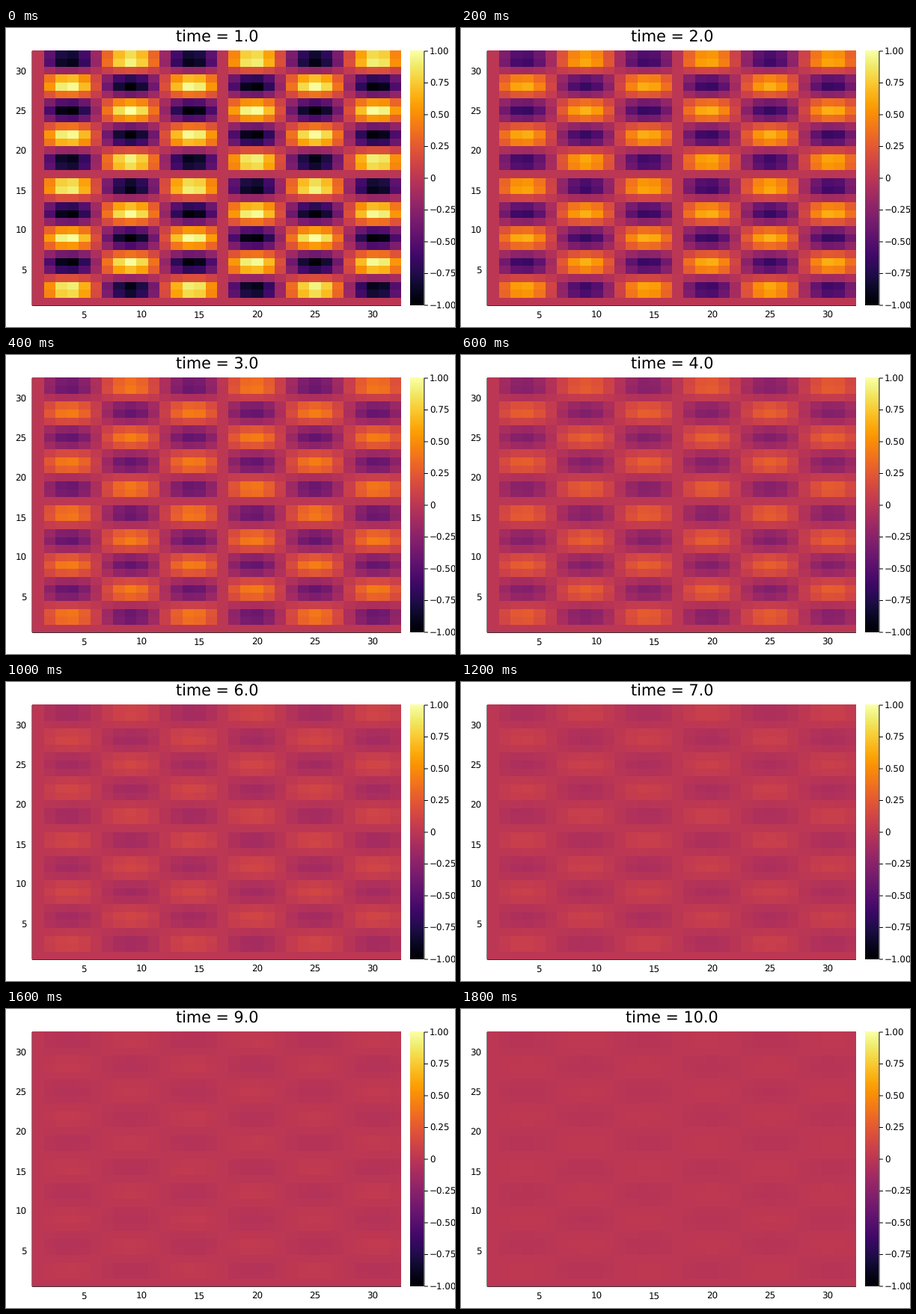
Animation, 600 px wide and 400 px high, one loop 2000 ms. Source, as a matplotlib script:

```python
import numpy as np
import matplotlib.pyplot as plt
from matplotlib.animation import FuncAnimation

W, H, DPI = 600, 400, 100
N = 32                     # grid cells per side
FRAMES, INTERVAL = 10, 200
KX, KY, NU = 3, 5, 0.01    # wave numbers and viscosity
DECAY = 1 - NU * (KX**2 + KY**2)

LEFT, RIGHT, TOP, BOTTOM = 35, 528, 31, 371
IMG_TOP = TOP - 1          # images reach one pixel above the axes
BAR_L, BAR_R = 540, 558
BAR_AXIS = BAR_R + 0.9
PX = 72 / DPI              # one pixel in points
TICK_SIZE, TITLE_SIZE = 11.9 * PX, 20.8 * PX

plt.rcParams["font.family"] = "DejaVu Sans"
plt.rcParams["text.hinting"] = "none"

fig = plt.figure(figsize=(W / DPI, H / DPI), dpi=DPI, facecolor="white")
ax = fig.add_axes([0, 0, 1, 1])
ax.axis("off")


def line(x, y, zorder=3):
    ax.plot(x, y, color="black", lw=PX, solid_capstyle="butt",
            snap=False, zorder=zorder)


def label(x, y, text, ha, size=TICK_SIZE):
    return ax.text(x, y, text, ha=ha, va="baseline", fontsize=size, color="black")


def to_pixels(cells, width, height):
    """Enlarge a grid, first row at the bottom, to whole pixels."""
    rows, cols = cells.shape
    r = np.arange(height) * rows // height
    c = np.arange(width) * cols // width
    return cells[::-1][np.ix_(r, c)]


def picture(cells, left, right):
    pixels = to_pixels(cells, right - left, BOTTOM - IMG_TOP)
    image = ax.imshow(pixels, extent=(left, right, BOTTOM, IMG_TOP),
                      origin="upper", cmap="inferno", vmin=-1, vmax=1,
                      aspect="auto", interpolation="nearest", zorder=2)
    return image, pixels


def cell_x(i):
    return LEFT + (i - 0.5) * (RIGHT - LEFT) / N


def cell_y(j):
    return BOTTOM - (j - 0.5) * (BOTTOM - TOP) / N


ax.set_xlim(0, W)
ax.set_ylim(H, 0)

# Initial field: a product of two sine waves
phase = 2 * np.pi * np.arange(N) / N
wave = np.outer(np.sin(KY * phase), np.sin(KX * phase))
heat, field = picture(wave, LEFT, RIGHT)

# Axis lines and tick labels
line([LEFT, LEFT], [TOP, BOTTOM], zorder=1)
line([LEFT, RIGHT], [BOTTOM + 0.3, BOTTOM + 0.3], zorder=1)
for n in range(5, N, 5):
    label(cell_x(n), 388, str(n), "center")
    label(27.5, cell_y(n) + 5, str(n), "right")

# Colour bar
picture(np.linspace(-1, 1, 256)[:, None], BAR_L, BAR_R)
line([BAR_AXIS, BAR_AXIS], [TOP, BOTTOM])
for v in np.linspace(-1, 1, 9):
    y = (TOP + BOTTOM) / 2 - v * (BOTTOM - TOP) / 2
    line([BAR_AXIS, BAR_AXIS + 5], [y, y])
    text = f"{v:.2f}".replace("-", "\u2212") if v else "0"
    label(566, y + 4.4, text, "left")

title = label((LEFT + RIGHT) / 2 + 0.5, 18.4, "", "center", TITLE_SIZE)

# Drawing the images moves the limits, so fix the pixel grid again
ax.set_xlim(0, W)
ax.set_ylim(H, 0)


def draw(i):
    heat.set_data(field * DECAY**i)
    title.set_text(f"time = {i + 1:.1f}")
    return heat, title


anim = FuncAnimation(fig, draw, frames=FRAMES, interval=INTERVAL,
                     repeat=True, repeat_delay=0)
plt.show()
```
